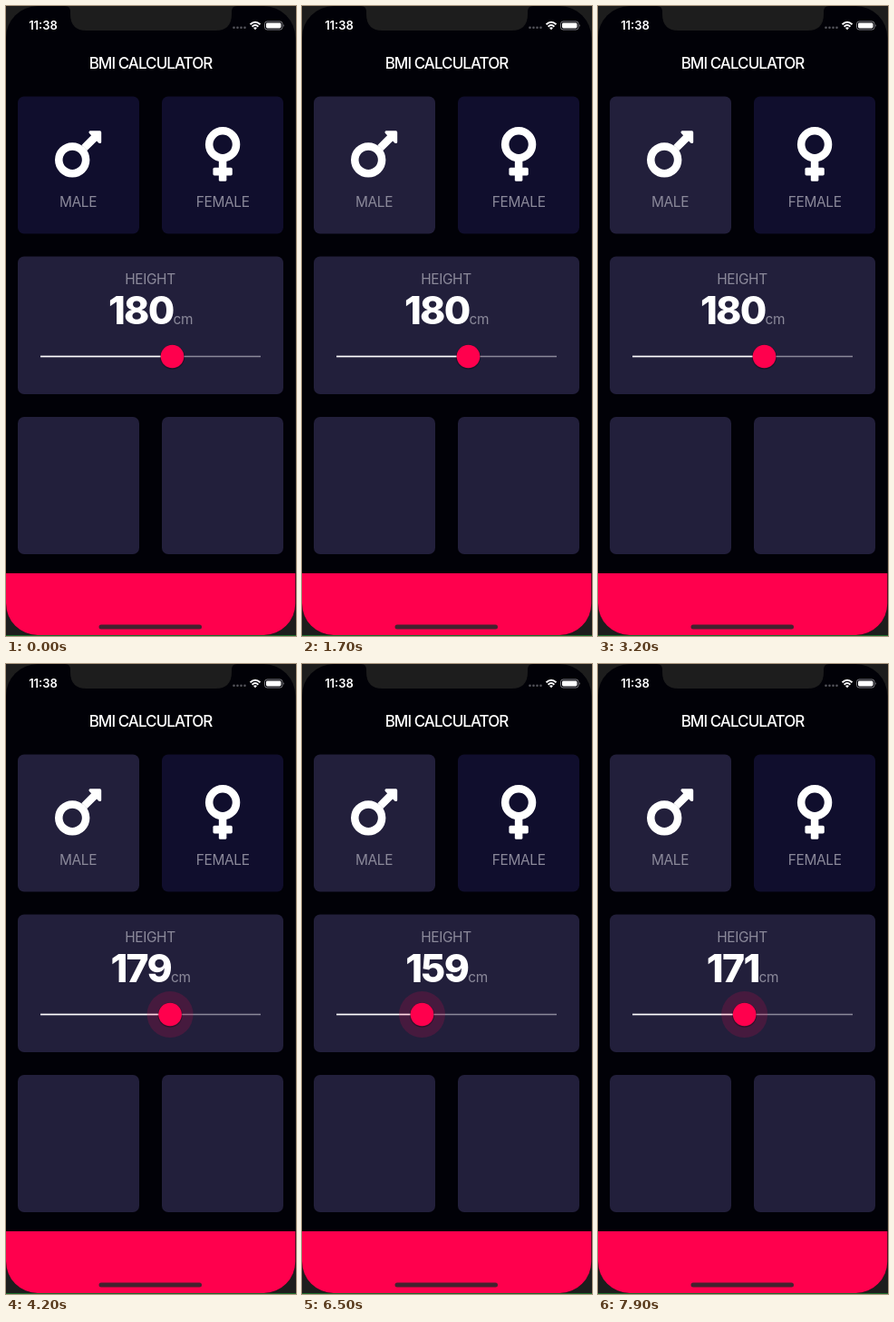
An HTML page that plays this animation: 320 by 693 pixels, repeating every 8 s.

```html
<!DOCTYPE html>
<html lang="en">
<head>
<meta charset="utf-8">
<title>BMI Calculator</title>
<style>
  html, body { margin: 0; width: 100%; height: 100%; overflow: hidden; background: #1d1d1d; }
  svg { display: block; width: 100vw; height: 100vh; font-family: Inter, Roboto, sans-serif; }
  .card { fill: #221f3b; }
  .male { animation: male 8s step-end infinite; }
  .female { animation: female 8s step-end infinite; }
  .halo { fill: #ff004d; fill-opacity: .16; animation: halo 8s linear infinite; }
  .icon { fill: #fff; }
  .ring { fill: none; stroke: #fff; stroke-width: 64; }
  .label { font-size: 15.4px; letter-spacing: -.35px; fill: #8b899a; text-anchor: middle; }
  .value { font-size: 42.7px; font-weight: 800; letter-spacing: -1.7px; fill: #fff; }
  .unit { font-size: 15.4px; letter-spacing: -.35px; fill: #8b899a; }
  .title { font-size: 17px; font-weight: 500; letter-spacing: -.95px; fill: #fff; text-anchor: middle; }
  .clock { font-size: 13px; font-weight: 600; fill: #fff; text-anchor: middle; }
  @keyframes male {
    0% { fill: #100e2d; }
    17.5% { fill: #221f3b; }
    30% { fill: #100e2d; }
    40%, 100% { fill: #221f3b; }
  }
  @keyframes female {
    0% { fill: #100e2d; }
    30% { fill: #221f3b; }
    40%, 100% { fill: #100e2d; }
  }
  @keyframes halo {
    0%, 51% { r: 0; }
    52.4%, 100% { r: 25.5px; }
  }
</style>
</head>
<body>
<svg viewBox="0 0 320 693" preserveAspectRatio="none">
  <defs>
    <clipPath id="screen"><rect width="319.3" height="692" rx="35"/></clipPath>
  </defs>
  <rect width="320" height="693" fill="#1d1d1d"/>
  <rect y="692" width="320" height="1" fill="#1c6b2b"/>
  <g clip-path="url(#screen)">
    <rect width="320" height="693" fill="#010107"/>
    <rect y="624" width="320" height="69" fill="#ff004d"/>
  </g>
  <path d="M65 0Q71 0 71 6V9Q71 27 89 27H231Q249 27 249 9V6Q249 0 255 0Z" fill="#1d1d1d"/>

  <text class="clock" x="41" y="26">11:38</text>
  <g fill="#55555c">
    <circle cx="251.5" cy="23.8" r="1.3"/><circle cx="255.5" cy="23.8" r="1.3"/>
    <circle cx="259.5" cy="23.8" r="1.3"/><circle cx="263.5" cy="23.8" r="1.3"/>
  </g>
  <g fill="none" stroke="#fff" stroke-width="1.9">
    <path d="M269.5 20.3Q275 15.2 280.5 20.3M271.6 22.7Q275 19.4 278.4 22.7"/>
    <path d="M273 24L275 26.2L277 24Q275 22.6 273 24Z" fill="#fff" stroke="none"/>
  </g>
  <rect x="285.5" y="17" width="19.5" height="9" rx="2.6" fill="none" stroke="#8a8a8e" stroke-width=".9"/>
  <rect x="287" y="18.5" width="16.5" height="6" rx="1.4" fill="#fff"/>
  <path d="M306 20Q307.5 21.5 306 23Z" fill="#8a8a8e"/>

  <text class="title" x="159.5" y="69">BMI CALCULATOR</text>

  <rect class="card male" x="13" y="99.5" width="134" height="151" rx="7"/>
  <rect class="card female" x="172" y="99.5" width="134" height="151" rx="7"/>
  <rect class="card" x="13" y="275.5" width="293" height="151.5" rx="7"/>
  <rect class="card" x="13" y="452" width="134" height="151" rx="7"/>
  <rect class="card" x="172" y="452" width="134" height="151" rx="7"/>

  <g class="icon" transform="translate(54 128.8) scale(.1333)">
    <circle class="ring" cx="144" cy="304" r="112"/>
    <path d="M372 64H293C282 64 277 77 284 84L301 101L221 182L266 227L346 147L363 164C371 171 384 166 384 155V76Q384 64 372 64Z"/>
  </g>
  <g class="icon" transform="translate(219.9 128.8) scale(.1333)">
    <circle class="ring" cx="144" cy="176" r="112"/>
    <rect x="112" y="300" width="64" height="180" rx="12"/>
    <rect x="64" y="368" width="160" height="64" rx="12"/>
  </g>
  <text class="label" x="79.5" y="221">MALE</text>
  <text class="label" x="239.2" y="221">FEMALE</text>
  <text class="label" x="159" y="306">HEIGHT</text>
  <text x="159.5" y="350" text-anchor="middle"><tspan class="value" id="value">180</tspan><tspan class="unit">cm</tspan></text>

  <path d="M38 385.5H281" stroke="#8b899a" stroke-width="1.7"/>
  <path id="filled" stroke="#fff" stroke-width="1.7"/>
  <g id="thumb">
    <circle class="halo" r="0"/>
    <circle cy=".6" r="13.6" fill="#000" fill-opacity=".3"/>
    <circle r="12.8" fill="#ff004d"/>
  </g>
  <rect x="102.5" y="680.5" width="113.5" height="5" rx="2.5" fill="#43222f"/>
</svg>
<script>
  const LOOP = 8000;
  // [time, height in cm]
  const drag = [
    [0, 180], [4100, 180], [4200, 179], [4800, 168], [5000, 168], [5200, 165],
    [6500, 159], [7200, 165], [7450, 165], [7900, 171], [8000, 172]
  ];
  const find = id => document.getElementById(id);
  const value = find('value'), filled = find('filled'), thumb = find('thumb');

  function heightAt(t) {
    const i = drag.findIndex(([end]) => t < end);
    const [t0, h0] = drag[i - 1], [t1, h1] = drag[i];
    return Math.round(h0 + (h1 - h0) * (t - t0) / (t1 - t0));
  }

  function draw() {
    const height = heightAt(performance.now() % LOOP);
    const x = 38 + (height - 120) * 2.43;
    value.textContent = height;
    filled.setAttribute('d', `M38 385.5H${x}`);
    thumb.setAttribute('transform', `translate(${x - .3} 385.5)`);
    requestAnimationFrame(draw);
  }
  draw();
</script>
</body>
</html>
```
